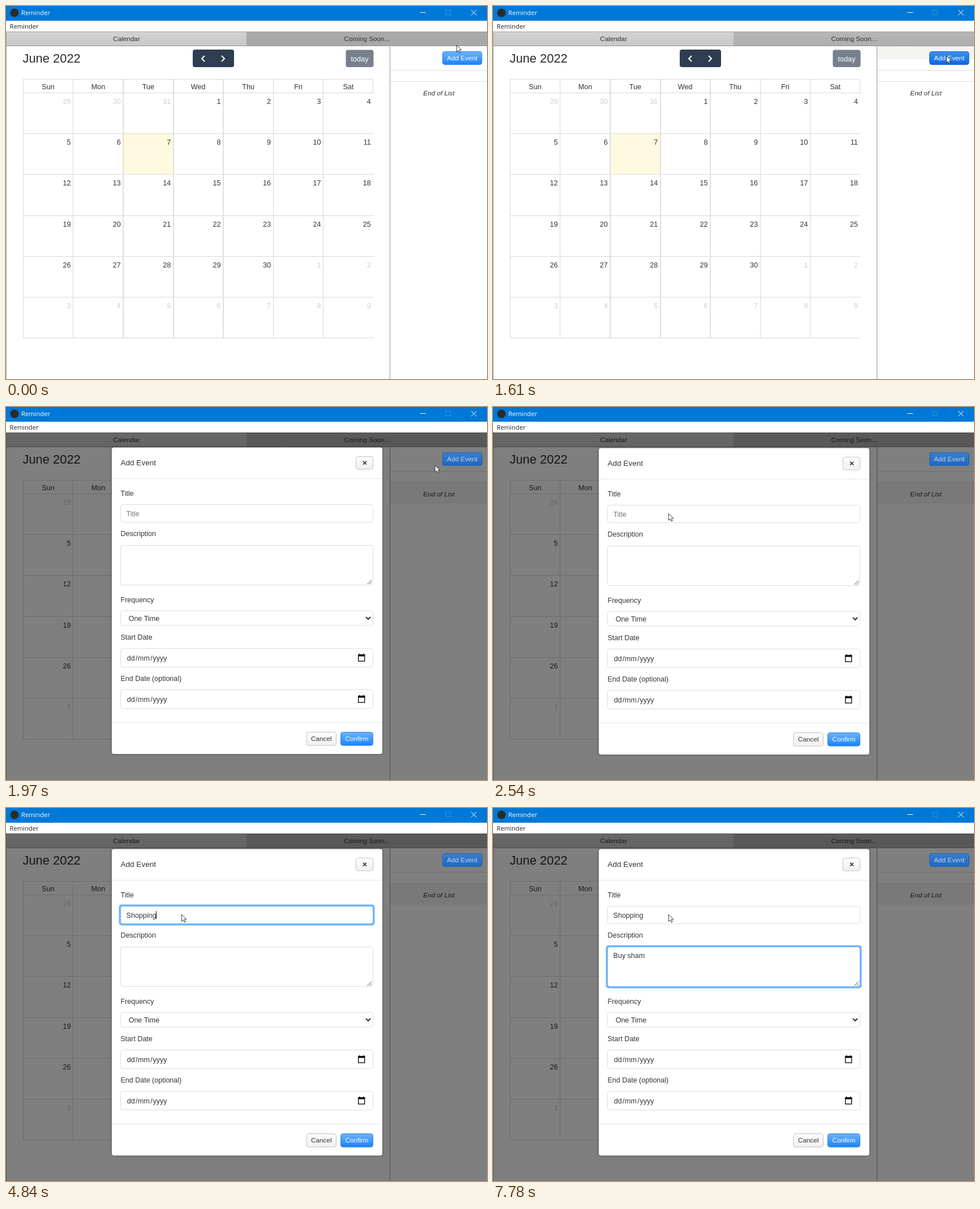
Write an HTML page with a canvas that moves like this. It is 850 px wide and 659 px high and loops after 8 s.

```html
<!DOCTYPE html>
<html lang="en">
<head>
<meta charset="utf-8">
<title>Reminder</title>
<style>
  html, body { margin: 0; width: 100%; height: 100%; overflow: hidden; }
  canvas { display: block; }
</style>
</head>
<body>
<canvas id="stage" width="850" height="659"></canvas>
<script>
const ctx = document.getElementById('stage').getContext('2d');
const LOOP = 8000;
const SANS = '"Liberation Sans", Arial, sans-serif';
const UI = '"Open Sans", "Noto Sans", sans-serif';
const INK = '#333';

// Each row starts with the time in ms from which it holds.
const POINTER = [
  [0, 796, 69], [150, 802, 72], [270, 810, 77], [390, 816, 80], [670, 816, 81],
  [1070, 811, 83], [1190, 806, 86], [1340, 803, 87], [1460, 801, 88],
  [1970, 758, 103], [2120, 552, 261], [2270, 317, 166], [2390, 327, 221], [2540, 310, 188]
];
const MODAL_SHIFT = [[1730, -47], [1850, -14], [1970, -1], [2120, 0]];
const TYPING = [
  [0, '', '', ''],
  [2820, 'title', '', '', true], [3250, 'title', '', ''],
  [3810, 'title', 'S', '', true], [3930, 'title', 'Shp', '', true],
  [4080, 'title', 'Sh', '', true], [4200, 'title', 'Shop', '', true],
  [4350, 'title', 'Shopp', '', true], [4600, 'title', 'Shoppi', '', true],
  [4720, 'title', 'Shoppin', '', true], [4840, 'title', 'Shopping', '', true],
  [5120, 'desc', 'Shopping', '', true], [5710, 'desc', 'Shopping', ''],
  [5980, 'desc', 'Shopping', 'B', true], [6100, 'desc', 'Shopping', 'Bu', true],
  [6220, 'desc', 'Shopping', 'Buy ', true], [6840, 'desc', 'Shopping', 'Buy '],
  [6960, 'desc', 'Shopping', 'Buy s', true], [7110, 'desc', 'Shopping', 'Buy sh', true],
  [7230, 'desc', 'Shopping', 'Buy sha', true], [7350, 'desc', 'Shopping', 'Buy sham', true],
  [7780, 'desc', 'Shopping', 'Buy sham']
];

const current = (rows, t) => rows.findLast(row => row[0] <= t);

function rect(x, y, w, h, fill) {
  ctx.fillStyle = fill;
  ctx.fillRect(x, y, w, h);
}

function gradient(y, h, top, bottom) {
  const g = ctx.createLinearGradient(0, y, 0, y + h);
  g.addColorStop(0, top);
  g.addColorStop(1, bottom);
  return g;
}

function box(x, y, w, h, r, fill, stroke) {
  ctx.beginPath();
  ctx.roundRect(x, y, w, h, r);
  ctx.fillStyle = fill;
  ctx.fill();
  if (!stroke) return;
  ctx.strokeStyle = stroke;
  ctx.lineWidth = 1;
  ctx.stroke();
}

// Polylines given as flat coordinate lists.
function lines(color, width, ...paths) {
  ctx.strokeStyle = color;
  ctx.lineWidth = width;
  ctx.beginPath();
  for (const p of paths) {
    ctx.moveTo(p[0], p[1]);
    for (let i = 2; i < p.length; i += 2) ctx.lineTo(p[i], p[i + 1]);
  }
  ctx.stroke();
}

// Text is placed by the middle of its capitals.
function text(str, x, middle, size = 12.5, color = INK, align = 'left', font = SANS, style = '') {
  ctx.font = `${style} ${size}px ${font}`;
  ctx.textAlign = align;
  ctx.fillStyle = color;
  ctx.fillText(str, x, Math.round(middle + size * 0.36));
}

function button(label, x, y, w, h, primary, pressed) {
  const fill = !primary ? gradient(y, h, '#fcfcfc', '#f1f1f1')
    : pressed ? gradient(y, h, '#3d8ff0', '#0a6ae0')
    : gradient(y, h, '#6eb4f7', '#1a82fb');
  box(x, y, w, h, 4, fill, !primary ? '#c2c0c2' : pressed ? '#1068d8' : '#2f86f2');
  text(label, x + w / 2, y + h / 2, 11.75, primary ? '#fff' : INK, 'center');
}

function drawWindowBar() {
  rect(0, 0, 850, 26, '#0078d7');
  ctx.fillStyle = '#2b2b2b';
  ctx.beginPath();
  ctx.arc(15, 12, 7.5, 0, 7);
  ctx.fill();
  text('Reminder', 27, 12, 11.2, '#fff', 'left', UI);
  lines('#fff', 1, [732, 11.5, 742, 11.5], [822, 7, 831.5, 16.5], [831.5, 7, 822, 16.5]);
  ctx.strokeStyle = '#3395df';
  ctx.strokeRect(777.5, 7.5, 8, 8);
  rect(0, 26, 850, 19, '#fff');
  text('Reminder', 6.5, 36, 11.2, '#222', 'left', UI);
}

function drawTabs(t) {
  rect(0, 45, 425, 25, gradient(45, 25, '#d3d2d3', '#c9c8c9'));
  rect(425, 45, 425, 25, t < 1610 ? '#a8a8a8' : gradient(45, 25, '#b7b6b7', '#b0aeb0'));
  rect(0, 45, 850, 1, '#adabad');
  rect(0, 70, 850, 1, '#989698');
  text('Calendar', 213, 57.5, 11.73, INK, 'center');
  text('Coming Soon...', 638, 57.5, 11.73, INK, 'center');
}

function drawCalendar() {
  const left = 30, top = 153.5, colW = 88.4, rowH = 72.2;
  const right = left + 7 * colW;
  text('June 2022', 29.5, 92, 21.9, '#2c2c2c');
  box(330, 77, 73, 31, 4, '#2c3e50');
  lines('#fff', 2, [351, 88, 346, 93, 351, 98], [381, 88, 386, 93, 381, 98]);
  box(600.5, 77.5, 49, 30.5, 4, '#76818d');
  text('today', 625, 93, 12.7, '#fff', 'center');

  rect(207.5, 226, 87.5, 72, '#fffadf');
  const grid = '#d9d9d9';
  rect(left, 129, right - left, 1, grid);
  for (let r = 0; r < 7; r++) rect(left, Math.floor(top + r * rowH), 620, 1, grid);
  for (let c = 0; c < 7; c++) {
    const wide = c > 1 && c < 5;
    rect(Math.floor(left + c * colW) + (wide ? 0.3 : 0), 129, wide ? 1.6 : 1, 458, grid);
  }
  rect(648, 129, 1, 25, grid);

  'Sun Mon Tue Wed Thu Fri Sat'.split(' ').forEach((day, c) =>
    text(day, left + (c + 0.5) * colW + 0.3, 142, 12.6, INK, 'center'));
  for (let i = 0; i < 42; i++) {
    const day = i < 3 ? 29 + i : (i - 3) % 30 + 1;
    const inMonth = i >= 3 && i < 33;
    text(day, left + (i % 7 + 1) * colW - 4, top + Math.floor(i / 7) * rowH + 15,
      12.6, inMonth ? INK : '#cfcfcf', 'right');
  }
}

function drawSidebar(t) {
  const pressed = t >= 1610 && t < 1730;
  if (pressed) rect(679, 71, 171, 23, '#f3f3f2');
  if (t >= 1730) rect(679, 134, 171, 37, '#f3f3f3');
  rect(678, 70, 1, 589, '#989698');
  rect(679, 113, 171, 1, '#ddd');
  rect(679, 133, 171, 1, '#ddd');
  text('End of List', 765, 153.5, 11.73, INK, 'center', SANS, 'italic');
  button('Add Event', 771.5, 80.5, 69.5, 23, true, pressed);
}

function field(y, h, focused) {
  if (focused) box(199.5, y - 3, 452, h + 6, 5, '#6db3fd');
  box(202.5, y, 446, h, 4, '#fff', focused ? '#6db3fd' : '#ddd');
}

function drawInput(value, middle, focused, caret) {
  text(value, 212.6, middle);
  if (focused && caret) {
    rect(Math.round(212.6 + ctx.measureText(value).width), middle - 7, 1, 14, '#111');
  }
}

function drawDate(y) {
  field(y, 33);
  const mid = y + 17;
  [['dd', 213.7], ['/', 229], ['mm', 233], ['/', 255.2], ['yyyy', 259.5]]
    .forEach(([part, x]) => text(part, x, mid));
  ctx.strokeStyle = '#111';
  ctx.lineWidth = 1.4;
  ctx.strokeRect(622.7, y + 11.5, 11, 11);
  rect(622, y + 10.5, 12.4, 3.6, '#111');
  rect(624, y + 9.3, 1.5, 2, '#111');
  rect(631, y + 9.3, 1.5, 2, '#111');
}

function drawModal(shift, [, focus, title, desc, caret]) {
  ctx.save();
  ctx.translate(0, shift);
  ctx.shadowColor = 'rgba(0,0,0,.35)';
  ctx.shadowBlur = 4;
  box(187, 72.5, 478, 541.5, 4, '#fff');
  ctx.shadowColor = 'transparent';
  text('Add Event', 202.5, 99.5, 13.55);
  button('', 618.5, 88.5, 30, 22.5);
  lines('#444', 1.9, [631, 96.7, 637, 102.7], [637, 96.7, 631, 102.7]);
  rect(187, 127, 478, 1, '#e6e6e6');
  rect(187, 558, 478, 1, '#e6e6e6');

  [['Title', 153.5], ['Description', 224.5], ['Frequency', 341],
   ['Start Date', 407.5], ['End Date (optional)', 480.5]]
    .forEach(([label, y]) => text(label, 202.5, y));

  field(173.5, 31, focus === 'title');
  if (!title) text('Title', 212.6, 189, 12.5, '#777');
  drawInput(title, 189, focus === 'title', caret);

  field(245.5, 70, focus === 'desc');
  drawInput(desc, 260, focus === 'desc', caret);
  lines('#444', 1, [638.5, 314, 646, 306.5], [642.5, 314, 646, 310.5]);

  field(361, 26);
  text('One Time', 216.7, 374.5);
  lines('#222', 1.8, [636, 372, 640, 376, 644, 372]);

  drawDate(427.5);
  drawDate(500.5);
  button('Cancel', 531, 575.5, 52.5, 23.5);
  button('Confirm', 591.5, 575.5, 57, 23.5, true);
  ctx.restore();
}

function drawPointer([, x, y]) {
  ctx.save();
  ctx.translate(x + 0.2, y);
  ctx.beginPath();
  [[0, 0], [0, 12.3], [2.9, 9.7], [4.8, 14], [6.9, 13.1], [5, 8.9], [8.6, 8.7]]
    .forEach(p => ctx.lineTo(...p));
  ctx.closePath();
  ctx.fillStyle = '#fff';
  ctx.fill();
  ctx.strokeStyle = '#222';
  ctx.lineWidth = 0.9;
  ctx.stroke();
  ctx.restore();
}

function draw(t) {
  rect(0, 0, 850, 659, '#fff');
  drawTabs(t);
  drawCalendar();
  drawSidebar(t);
  rect(0, 45, 1, 614, '#a5a5a5');
  const slide = current(MODAL_SHIFT, t);
  if (slide) {
    rect(0, 45, 850, 614, 'rgba(0,0,0,.5)');
    // The button stays brighter than the rest of the dimmed page.
    box(771.5, 80.5, 69.5, 23, 4, gradient(80, 23, '#3a7fcf', '#2068c0'), '#2565b0');
    text('Add Event', 806.25, 92, 11.75, '#c3d0e0', 'center');
    drawModal(slide[1], current(TYPING, t));
  }
  drawWindowBar();
  drawPointer(current(POINTER, t));
}

const start = performance.now();
function tick() {
  draw((performance.now() - start) % LOOP);
  requestAnimationFrame(tick);
}
tick();
</script>
</body>
</html>
```
